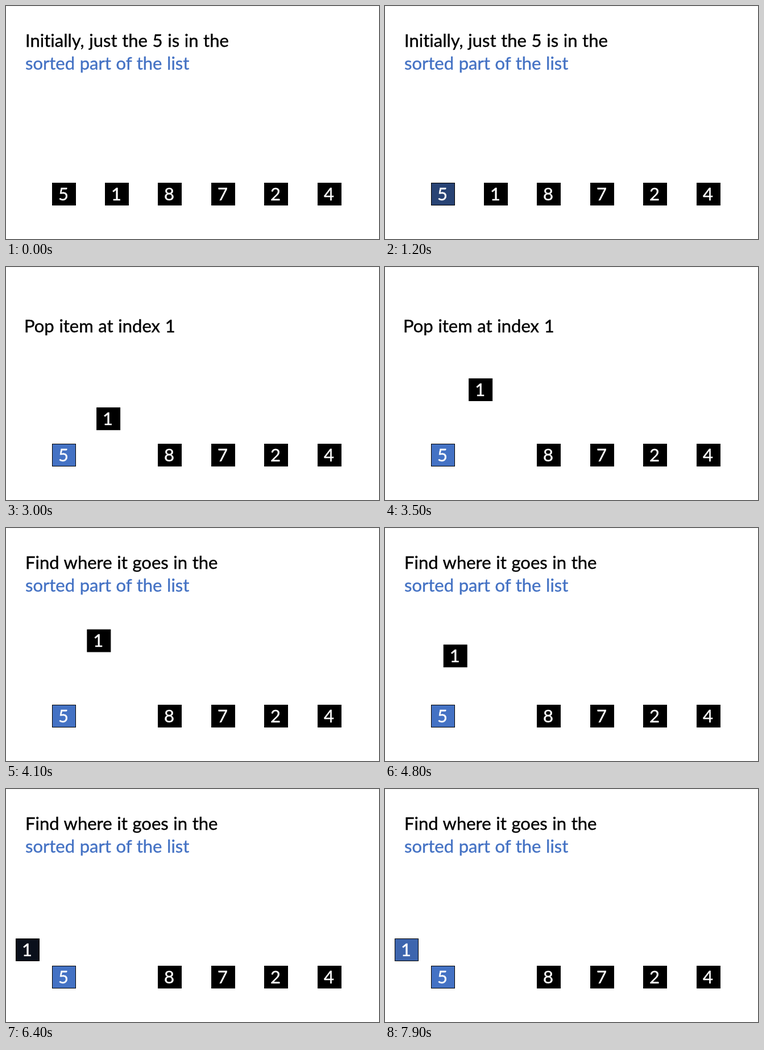
Write an HTML page that moves like this. It is 656 by 410 pixels and loops after 8 s.

```html
<!DOCTYPE html>
<html lang="en">
<head>
<meta charset="utf-8">
<title>Insertion sort</title>
<style>
  html, body { margin: 0; width: 100%; height: 100%; overflow: hidden; background: #fff; }
  svg { display: block; width: 656px; height: 410px; }
  text {
    font: 31px Lato, sans-serif; font-variant-ligatures: none; word-spacing: 0.7px;
    color: #000; fill: currentColor; stroke: currentColor; stroke-width: 0.4px;
  }
  .sorted { color: #4472c4; }
  .item text { color: #fff; text-anchor: middle; }
  .item rect { stroke: #000; }
</style>
</head>
<body>
<svg viewBox="0 0 656 410">
  <rect width="656" height="1" fill="#f6f6f6"/>
  <text id="line1"></text>
  <text id="line2" class="sorted" x="34" y="112">sorted part of the list</text>
</svg>
<script>
const LOOP = 8000, STEP = 100, DURATION = 2000;
const BLUE = [68, 114, 196];
const START = [174, 311], LIFTED = [143, 178], PLACED = [17, 263];

const svg = document.querySelector("svg");
const line1 = document.getElementById("line1");
const line2 = document.getElementById("line2");

function add(parent, tag, attrs, text = "") {
  const el = document.createElementNS("http://www.w3.org/2000/svg", tag);
  for (const key in attrs) el.setAttribute(key, attrs[key]);
  el.textContent = text;
  return parent.appendChild(el);
}

function makeItem(digit, i) {
  const group = add(svg, "g", { class: "item" });
  const box = add(group, "rect", { x: 0.5, y: 0.5, width: 41, height: 39 });
  add(group, "text", { x: 20, y: 31 }, digit);
  const item = {
    place: (x, y) => group.setAttribute("transform", `translate(${x} ${y})`),
    tint: p => box.setAttribute("fill", `rgb(${BLUE.map(c => Math.round(c * p))})`)
  };
  item.place(Math.floor(81 + 93.4 * i), 311);
  item.tint(0);
  return item;
}

const [five, one] = [5, 1, 8, 7, 2, 4].map(makeItem);

const progress = (t, start) => Math.min(1, Math.max(0, (t - start) / DURATION));
const ease = u => u < 0.5 ? 2 * u * u : 1 - 2 * (1 - u) ** 2;
const mix = (a, b, p) => a.map((v, i) => v + (b[i] - v) * p);

function caption(t) {
  if (t < 2000) return ["Initially, just the 5 is in the", 34, 72];
  if (t < 4000) return ["Pop item at index 1", 32, 115];
  return ["Find where it goes in the", 34, 72];
}

function draw(now) {
  const t = Math.floor(now % LOOP / STEP) * STEP;
  const [text, x, y] = caption(t);
  line1.textContent = text;
  line1.setAttribute("x", x);
  line1.setAttribute("y", y);
  line2.setAttribute("visibility", t >= 2000 && t < 4000 ? "hidden" : "visible");

  five.tint(progress(t, 20));
  one.tint(progress(t, 6120));
  const lifted = mix(START, LIFTED, ease(progress(t, 2020)));
  one.place(...mix(lifted, PLACED, ease(progress(t, 4000))));
}

const began = performance.now();
function tick() {
  draw(performance.now() - began);
  requestAnimationFrame(tick);
}
tick();
</script>
</body>
</html>
```
